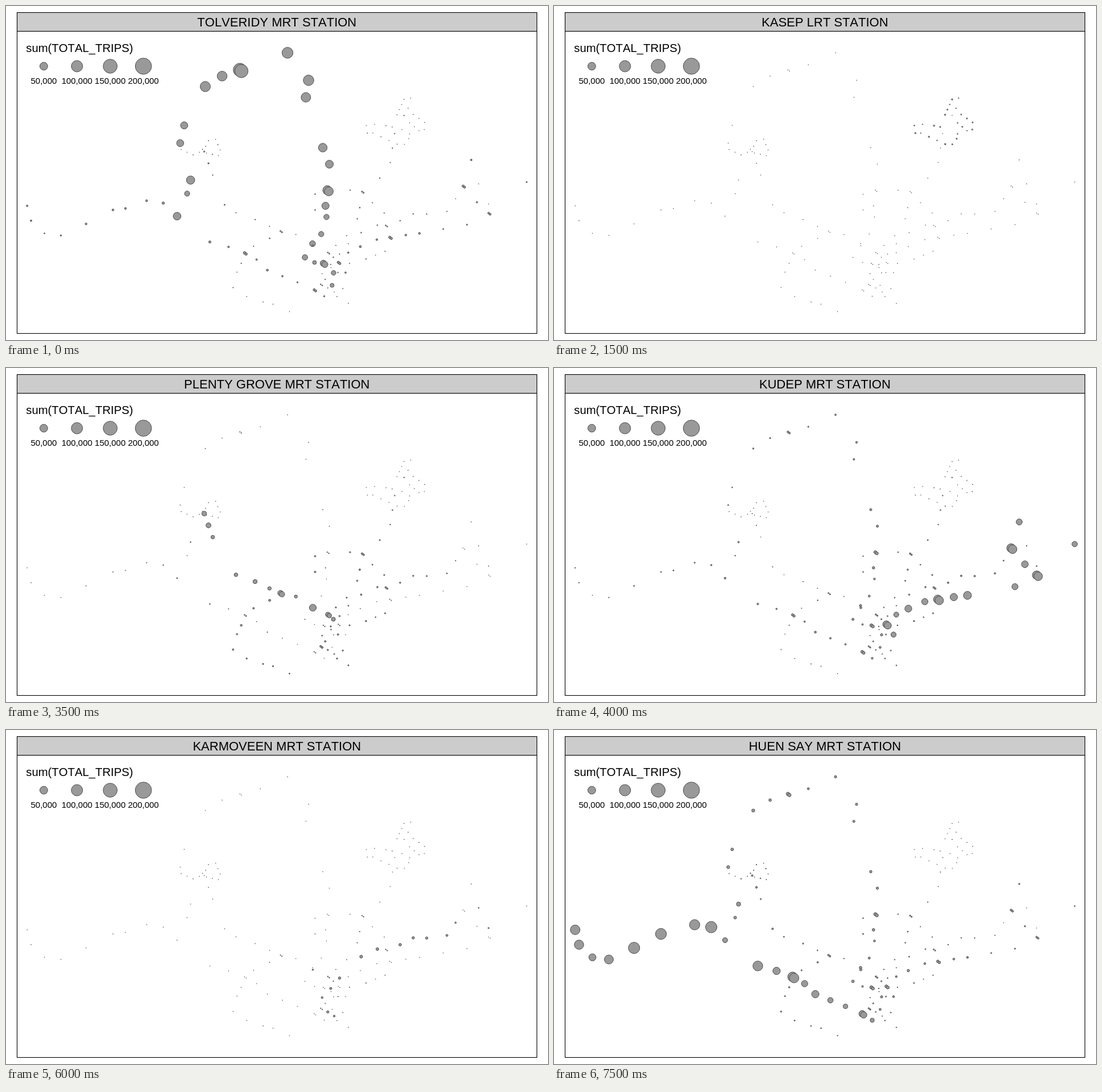
These frames come from a looping animation (953 by 588 pixels, 8000 ms). An HTML page:

```html
<!DOCTYPE html>
<html lang="en">
<head>
<meta charset="utf-8">
<title>Trips by station</title>
<style>
html, body { margin: 0; width: 100%; height: 100%; overflow: hidden; background: #fff; }
svg { display: block; width: 100vw; height: 100vh; }
text { font-family: "Liberation Sans", Arial, sans-serif; font-kerning: none; fill: #000; }
circle { fill: #999; stroke: #4d4d4d; stroke-width: 1; }
.frame { fill: none; stroke: #000; stroke-width: 1.1; }
</style>
</head>
<body>
<svg viewBox="0 0 953 588">
  <rect class="frame" x="19.5" y="44.5" width="914" height="532"/>
  <rect class="frame" x="19.5" y="11.5" width="914" height="33" style="fill:#ccc"/>
  <text id="title" x="476.3" y="36" font-size="22" text-anchor="middle"></text>
  <text x="35.3" y="80.8" font-size="20.3">sum(TOTAL_TRIPS)</text>
  <g id="legend"></g>
  <g id="map"></g>
</svg>
<script>
const HOLD = 500;
const TINY = 0.9;
const stops = [];

let seed = 7;
function random() {
  seed = seed * 16807 % 2147483647;
  return seed / 2147483647;
}

function add(parent, tag, attrs, text = "") {
  const el = document.createElementNS("http://www.w3.org/2000/svg", tag);
  for (const key in attrs) el.setAttribute(key, attrs[key]);
  el.textContent = text;
  return parent.appendChild(el);
}

function stop(line, x, y, popularity = 0.8 + 0.4 * random()) {
  stops.push({ line, x, y, popularity, el: add(map, "circle", { cx: x, cy: y }) });
}

// Each bend is [x, y, gaps]; stops are spaced evenly since the previous bend.
function route(line, ...bends) {
  let [px, py] = bends[0];
  for (const [x, y, gaps = 1] of bends) {
    for (let i = 1; i <= gaps; i++) {
      stop(line, px + (x - px) * i / gaps, py + (y - py) * i / gaps);
    }
    [px, py] = [x, y];
  }
}

// Interchanges are two overlapping, busier stops.
function hub(line, x, y) {
  stop(line, x - 1.3, y - 1, 1.3);
  stop(line, x + 1.3, y + 1, 1.3);
}

route("north", [318.5, 330.3], [324.5, 306.5], [306.3, 241.4], [313.3, 210.2], [350.4, 141.8],
  [380, 123.4], [447.2, 103.4], [495, 82.4], [532, 130.8], [527.3, 160.8], [557, 249.4],
  [568.6, 278.5], [561.8, 351.8], [563.5, 371.4], [554.3, 401.5], [539, 418.4],
  [525.6, 442.5], [542.5, 451.5], [576, 469.8], [573.4, 491.8]);
stop("north", 300.8, 370, 1.3);
hub("north", 412.6, 113.5);
hub("north", 566.3, 325.3);
hub("north", 559.3, 454);

route("west", [37.2, 351.8], [44, 378], [67.6, 400.2], [96.5, 404], [140.8, 383.6],
  [188.1, 359], [210, 356.4], [247.3, 342.8], [276.5, 347], [358.4, 415.4], [391.3, 424.1],
  [440.6, 446.5], [459.5, 465], [512.5, 486.5, 2], [559.5, 511]);
hub("west", 420.8, 435.6);
hub("west", 543.2, 500.6);

route("east", [597, 469.4], [601.8, 434.2], [623, 423.6], [652, 411.3], [703, 403.3],
  [727, 400.3], [810.5, 385, 2], [828, 345.5], [818, 271], [915.5, 310]);
hub("east", 585.6, 452.3);
hub("east", 676.1, 408.2);
hub("east", 805, 318);
hub("east", 850, 365.7);

route("northeast", [498.5, 538], [561.3, 481.3], [571.5, 460.5], [580, 421.5], [599, 404.3],
  [617.6, 374.6], [622, 355], [657.2, 303], [675.6, 275.6], [683.4, 224.6, 2], [700, 192.7]);
hub("northeast", 554.7, 491);
hub("northeast", 627.4, 327.8);

route("circle", [605, 324.3], [644.3, 346.3], [665, 364.5], [666.5, 431.8], [633, 445.5, 2],
  [604, 453], [583.7, 469.2], [592.2, 497.4], [582, 511.5], [602, 523.5], [543.5, 331.3],
  [543.5, 359], [463.6, 409], [435.3, 423], [413.6, 453], [406.1, 468.6], [399.3, 495.7],
  [423.2, 511.5], [452, 521], [469.5, 525]);
hub("circle", 669, 387.3);

route("hills", [348.5, 256.3], [363.5, 297.7, 2], [384.4, 350], [404.3, 364], [438, 376],
  [463.3, 388], [509.7, 402.3], [575.6, 442.3]);
stop("hills", 539.5, 422, 1.8);
hub("hills", 483.9, 397.3);
hub("hills", 567.2, 435);

route("bay", [577.1, 503.6], [565.8, 496.3], [555.8, 471.1], [571, 455], [602, 418.5, 2],
  [624.5, 399], [653, 385.8], [693, 378], [716, 365.9], [739.7, 366.3], [775.3, 361.6],
  [790.5, 339.2], [831, 313.1], [848.5, 348.7]);

route("light", [308, 252.8], [329, 262, 2], [340, 257.5], [351, 247, 2], [356, 237],
  [368.6, 234.5], [376.5, 253.5, 2], [373.3, 263.3], [352.6, 259, 2]);
route("light", [633.5, 210.4], [648, 208.4], [668.2, 210.8], [679, 213]);
route("light", [635.4, 223.8], [645, 223.7], [687.8, 243.2, 3], [700.4, 243.6], [708, 233.7],
  [709.5, 225.2], [696.2, 217.4], [709.6, 205.8], [726.2, 219.5, 2], [735.4, 217.5],
  [736, 205], [716, 191, 2], [707, 180], [711.4, 162.2], [700, 164.4], [687.6, 191.4, 3]);

const trunk = new Set(["north", "west", "east"]);

function affinity(a, b) {
  if (a === "light" || b === "light") return 0.35;
  return trunk.has(a) === trunk.has(b) ? 1 : 0.55;
}

// base: pull on every line; own: extra pull along the home line.
const scene = (name, line, x, y, base, own) => ({ name, line, x, y, base, own });

const scenes = [
  scene("TOLVERIDY MRT", "north", 447.2, 103.4, 3.6, 6),
  scene("SELTAVIR MRT", "east", 652, 411.3, 2.2, 2),
  scene("WEN RO DUI MRT", "north", 568.6, 278.5, 3.2, 6.2),
  scene("KASEP LRT", "light", 696.2, 217.4, 1.5, 1),
  scene("TANDUIR LRT", "light", 356, 237, 1.5, 1),
  scene("PELTRAY MRT", "circle", 644.3, 346.3, 2.4, 0.3),
  scene("QUAYHELM MRT", "bay", 565.8, 496.3, 2.8, 1.8),
  scene("PLENTY GROVE MRT", "hills", 384.4, 350, 2.4, 2.2),
  scene("KUDEP MRT", "east", 769.5, 392.7, 3.4, 3.4),
  scene("KUDEP NORTH MRT", "bay", 739.7, 366.3, 1.6, 2),
  scene("KUDEP RESERVOIR MRT", "bay", 775.3, 361.6, 2, 2.4),
  scene("PALDOREEN MRT", "bay", 571, 455, 1.8, 1.8),
  scene("KARMOVEEN MRT", "bay", 602, 418.5, 1.1, 1.6),
  scene("PIDRAN MRT", "north", 565, 324.3, 3.2, 5.5),
  scene("HUAN DEUP MRT", "northeast", 599, 404.3, 2.4, 2),
  scene("HUEN SAY MRT", "west", 210, 356.4, 4.4, 5.2)
];

function radius(stop, home) {
  const d = Math.hypot(stop.x - home.x, stop.y - home.y);
  if (d < 3) return 0;
  const base = home.base * affinity(stop.line, home.line) * Math.exp(-d / 650);
  const own = stop.line === home.line ? home.own * Math.exp(-((d / 400) ** 2)) : 0;
  return Math.max(TINY, (base + own) * stop.popularity);
}

// The outline lies inside the given radius.
function setRadius(el, r) {
  el.setAttribute("r", Math.max(0, r - 0.5));
  el.setAttribute("visibility", r ? "visible" : "hidden");
}

[50, 100, 150, 200].forEach((thousands, i) => {
  const x = 66.4 + 58.4 * i;
  setRadius(add(legend, "circle", { cx: x, cy: 106 }), 14.8 * Math.sqrt(thousands / 200));
  add(legend, "text", { x, y: 136.8, "font-size": 15, "text-anchor": "middle" }, thousands + ",000");
});

let shown;
function draw(time) {
  const home = scenes[Math.floor(time / HOLD) % scenes.length];
  if (home === shown) return;
  shown = home;
  title.textContent = home.name + " STATION";
  stops.forEach(s => setRadius(s.el, radius(s, home)));
}

const start = performance.now();
function tick() {
  draw(performance.now() - start);
  requestAnimationFrame(tick);
}
tick();
</script>
</body>
</html>
```
